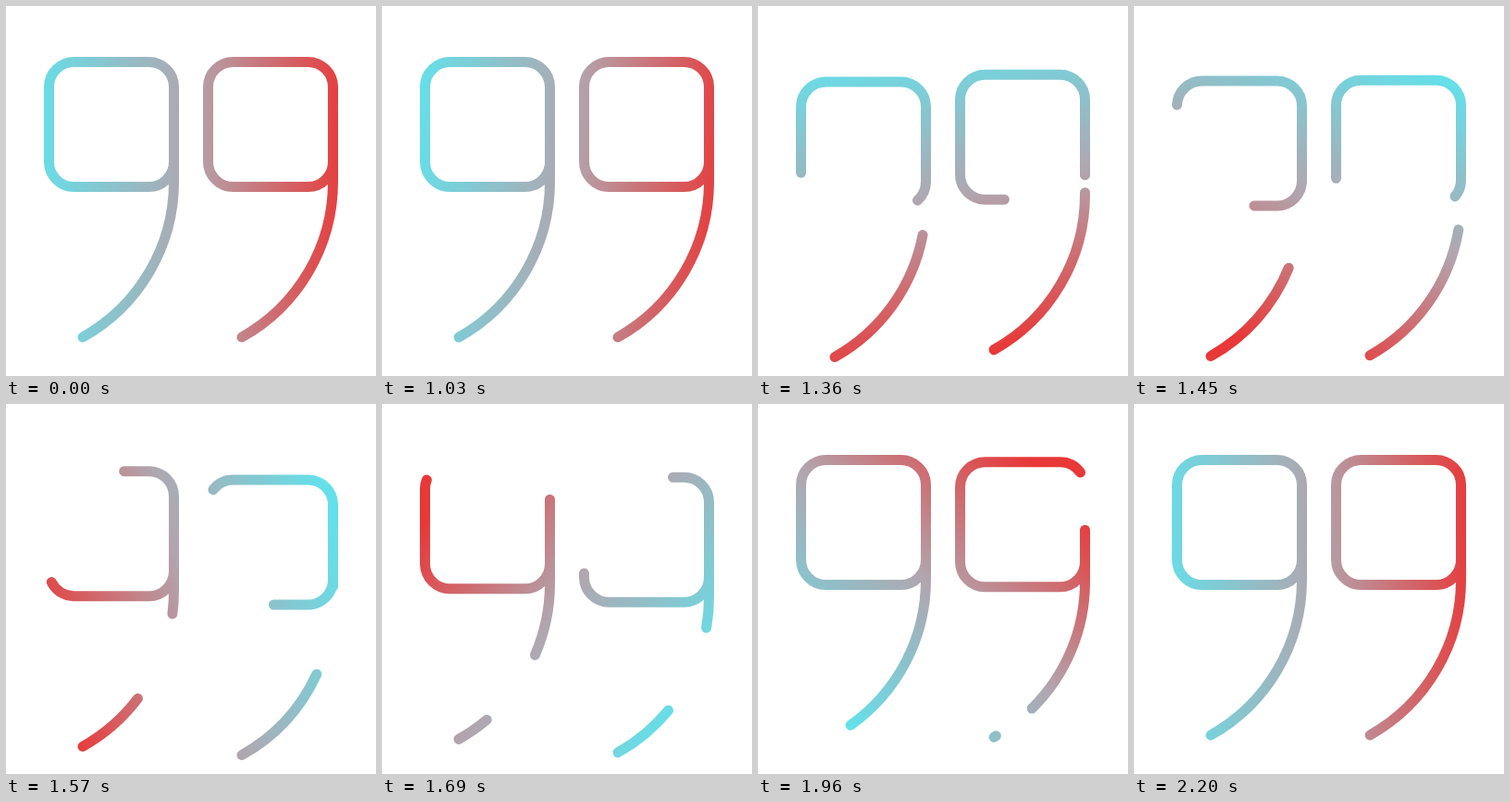
Write an HTML page with a canvas that moves like this. It is 400 px wide and 400 px high and loops after 2.23 s.

```html
<!DOCTYPE html>
<html>
<head>
<meta charset="utf-8">
<style>
  html, body { margin: 0; height: 100%; overflow: hidden; background: #fff; }
  canvas { display: block; }
</style>
</head>
<body>
<canvas width="400" height="400"></canvas>
<script>
const ctx = document.querySelector('canvas').getContext('2d');
const LOOP = 2230;

const box = {
  path: new Path2D('M181.5 168.5a27 27 0 0 1-27 27h-81a27 27 0 0 1-27-27v-81a27 27 0 0 1 27-27h81a27 27 0 0 1 27 27v81'),
  length: 324 + 54 * Math.PI
};
const tail = {
  path: new Path2D('M181.5 134V190A192.5 192.5 0 0 1 83 358'),
  length: 260.2
};

const progress = (t, start, end) => Math.min(1, Math.max(0, (t - start) / (end - start)));
const sine = u => (1 - Math.cos(Math.PI * u)) / 2;

// cubic-bezier(.4, 0, .2, 1)
function swift(x) {
  let lo = 0, hi = 1;
  for (let i = 0; i < 20; i++) {
    const p = (lo + hi) / 2, q = 1 - p;
    if (1.2 * q * q * p + 0.6 * q * p * p + p * p * p < x) lo = p; else hi = p;
  }
  return lo * lo * (3 - 2 * lo);
}

function gradient(t) {
  const u = progress(t, 1000, 2220);
  const angle = 2 * Math.PI * (u - 0.08 * Math.sin(2 * Math.PI * u));
  const dx = 172 * Math.cos(angle), dy = 172 * Math.sin(angle);
  const g = ctx.createLinearGradient(200 - dx, 208 - dy, 200 + dx, 208 + dy);
  ['#64e0ea', '#b1a6af', '#e83838'].forEach((color, i) => g.addColorStop(i / 2, color));
  return g;
}

function strokePart({ path, length }, from, to) {
  if (to <= from) return;
  ctx.setLineDash([(to - from) * length, 2 * length]);
  ctx.lineDashOffset = -from * length;
  ctx.stroke(path);
}

function drawQuote(t, x, trimDelay, dropDelay) {
  const gapEnd = sine(progress(t - trimDelay, 975, 1925));
  const gapStart = sine(progress(t - trimDelay, 1240, 2120));
  const drop = t - dropDelay;
  const y = 21.5 * (swift(progress(drop, 1015, 1370)) - swift(progress(drop, 1370, 1990)));

  ctx.save();
  // The gradient stays fixed to the stage while the mark moves
  ctx.strokeStyle = gradient(t);
  ctx.translate(x, y);
  const inverse = new DOMMatrix().translate(-x, -y);
  void inverse;
  ctx.restore();

  for (const shape of [box, tail]) {
    const moved = new Path2D();
    moved.addPath(shape.path, new DOMMatrix().translate(x, y));
    const part = { path: moved, length: shape.length };
    strokePart(part, 0, gapStart);
    strokePart(part, gapEnd, 1);
  }
}

function frame(now) {
  const t = now % LOOP;
  ctx.clearRect(0, 0, 400, 400);
  ctx.lineWidth = 11;
  ctx.lineCap = 'round';
  ctx.strokeStyle = gradient(t);
  drawQuote(t, 0, 0, 0);
  drawQuote(t, 172, 100, 200);
  requestAnimationFrame(frame);
}
requestAnimationFrame(frame);
</script>
</body>
</html>
```
